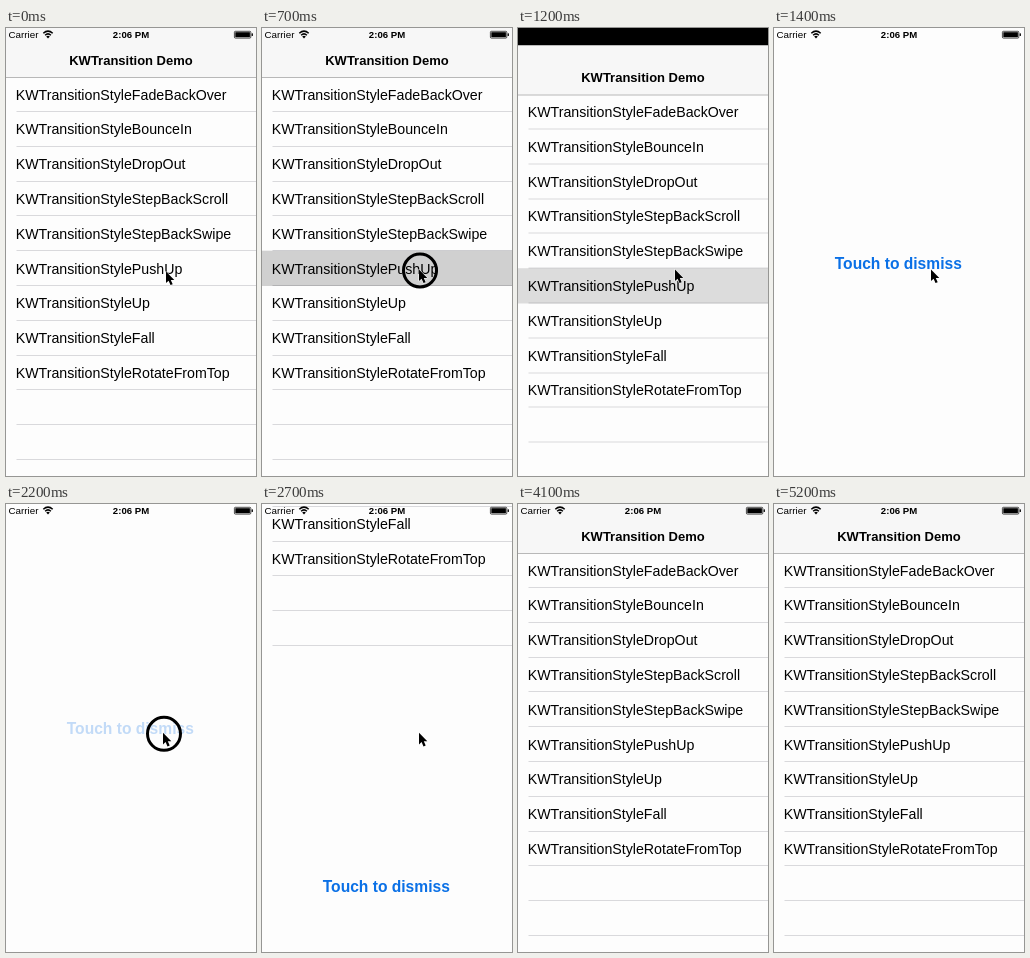
An HTML page for the animation above (5600 ms loop, 250 by 448 pixels).

```html
<!DOCTYPE html>
<html lang="en">
<head>
<meta charset="utf-8">
<title>Push up transition</title>
<style>
  html, body { margin: 0; width: 100%; height: 100%; overflow: hidden; background: #000; }
  svg { display: block; width: 250px; height: 448px; }
  text { font-family: "Liberation Sans", Arial, sans-serif; }
  .cell { font-size: 14.2px; }
  .title { font-size: 13px; font-weight: 700; text-anchor: middle; }
  .button { font-size: 15.6px; font-weight: 700; text-anchor: middle; fill: #0a70e6; }
  .status { font-size: 9.8px; }
  .clock { font-size: 9.6px; font-weight: 700; text-anchor: middle; }
  .arc { fill: none; stroke: #000; stroke-width: 1.5; }
</style>
</head>
<body>
<svg viewBox="0 0 250 448">
  <rect width="250" height="448"/>
  <g id="pages">
    <g id="list">
      <rect width="250" height="448" fill="#fdfdfd"/>
      <rect width="250" height="49" fill="#f7f7f7"/>
      <rect y="49" width="250" height="1" fill="#b8b8b8"/>
      <text class="title" x="125" y="36.5">KWTransition Demo</text>
    </g>
    <g transform="translate(0 448)">
      <rect width="250" height="448" fill="#fdfdfd"/>
      <text class="button" id="button" x="124.3" y="229.5">Touch to dismiss</text>
    </g>
  </g>
  <g id="statusBar">
    <text class="status" x="2.5" y="10.2">Carrier</text>
    <path class="arc" d="M37.3 5.2Q42 1 46.7 5.2M39.1 7.2Q42 4.6 44.9 7.2"/>
    <path d="M40.2 8.4Q42 6.9 43.8 8.4L42 10.4Z"/>
    <text class="clock" x="125" y="10.2">2:06 PM</text>
    <rect x="228.4" y="3.3" width="16.4" height="6.8" rx="1" fill="none" stroke="#000" stroke-width=".7"/>
    <rect x="229.3" y="4.2" width="14.6" height="5"/>
    <rect x="245.6" y="5.3" width="1.3" height="2.8" rx=".5"/>
  </g>
  <g id="pointer">
    <circle id="ring" cx="1" cy="1" r="16.5" fill="none" stroke="#000" stroke-width="3"/>
    <path d="M0 0V11.6L2.6 9.2L4.5 13.6L6.7 12.7L4.8 8.4H8.3Z" stroke="#fff" stroke-width="1" paint-order="stroke"/>
  </g>
</svg>
<script>
const LOOP = 5600, TICK = 100;
const ROW_TOP = 49.2, ROW_HEIGHT = 34.8, SELECTED = 5;
const styles = ["FadeBackOver", "BounceIn", "DropOut", "StepBackScroll", "StepBackSwipe",
  "PushUp", "Up", "Fall", "RotateFromTop"];

// Each track is a list of [time in ms, value].
const tracks = {
  scroll: [[1000, 0], [1100, 7], [1200, 17.5], [1300, -205], [1400, -437], [1500, -463],
    [1600, -455], [1700, -448], [2500, -448], [2600, -441], [2700, -290], [2800, -60], [2900, 0]],
  highlight: [[600, 0], [700, .18], [1100, .17], [1200, .13], [1400, 0]],
  x: [[0, 160], [500, 157]],
  y: [[0, 243.5], [500, 241.5], [1700, 241.5], [2100, 228.8]],
  pointer: [[3100, 1], [3600, 0]]
};

const byId = id => document.getElementById(id);
const within = (t, from, to) => t >= from && t < to;

function add(parent, name, attributes, text = "") {
  const node = document.createElementNS(parent.namespaceURI, name);
  for (const key in attributes) node.setAttribute(key, attributes[key]);
  node.textContent = text;
  parent.append(node);
  return node;
}

function valueAt(track, t) {
  const next = track.findIndex(([time]) => time > t);
  if (next === 0) return track[0][1];
  if (next < 0) return track[track.length - 1][1];
  const [t0, v0] = track[next - 1], [t1, v1] = track[next];
  return v0 + (v1 - v0) * (t - t0) / (t1 - t0);
}

const list = byId("list");
for (let row = 1; row <= 11; row++) {
  add(list, "rect", { x: 10.5, y: Math.round(ROW_TOP + row * ROW_HEIGHT) - 1,
    width: 240, height: 1, fill: "#d9d9dc" });
}
const highlight = add(list, "rect", { y: ROW_TOP + SELECTED * ROW_HEIGHT - .5, width: 250, height: 35.3 });
styles.forEach((style, row) =>
  add(list, "text", { class: "cell", x: 9.7, y: ROW_TOP + row * ROW_HEIGHT + 22.3 }, "KWTransitionStyle" + style));

function draw(now) {
  const t = Math.floor(now % LOOP / TICK) * TICK;
  const at = name => valueAt(tracks[name], t);
  const pressed = within(t, 2200, 2600);
  byId("pages").setAttribute("transform", `translate(0 ${at("scroll")})`);
  highlight.setAttribute("opacity", at("highlight"));
  byId("button").setAttribute("opacity", pressed ? .24 : 1);
  byId("pointer").setAttribute("transform", `translate(${at("x")} ${at("y")})`);
  byId("pointer").setAttribute("opacity", at("pointer"));
  byId("ring").setAttribute("opacity", pressed || within(t, 700, 1100) ? 1 : 0);
}

function frame(now) {
  draw(now);
  requestAnimationFrame(frame);
}
draw(0);
requestAnimationFrame(frame);
</script>
</body>
</html>
```
